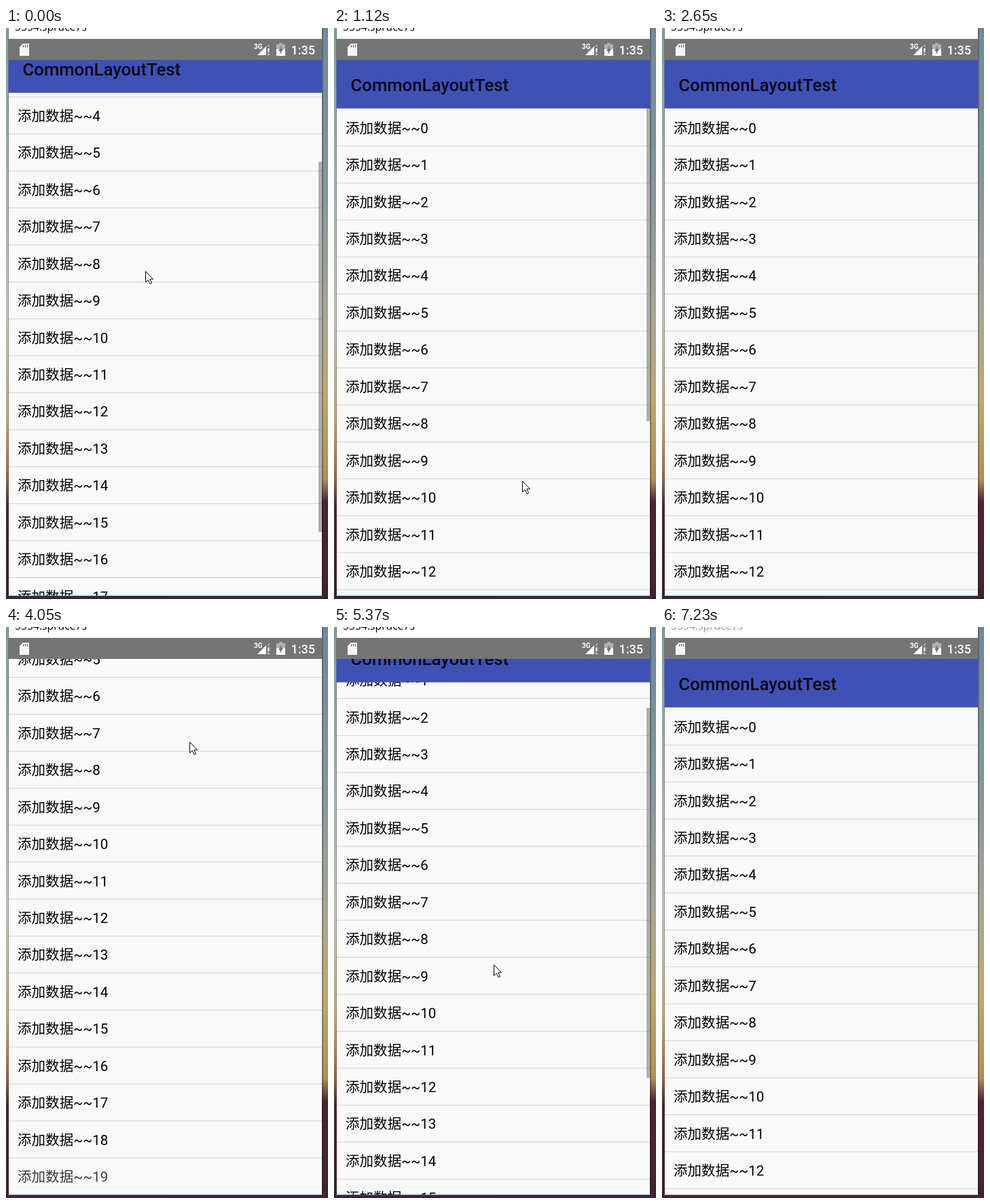
An HTML page with a canvas for the animation above (7330 ms loop, 474 by 841 pixels).

```html
<!DOCTYPE html>
<html lang="zh-CN">
<head>
<meta charset="utf-8">
<style>
  html, body { margin: 0; width: 474px; height: 841px; overflow: hidden; }
  canvas { display: block; }
</style>
</head>
<body>
<canvas id="stage" width="474" height="841"></canvas>
<script>
const ctx = document.getElementById('stage').getContext('2d');
const LOOP = 7330, STEP = 130;
const LEFT = 4, WIDTH = 461, TOP = 47, BOTTOM = 836;
const BAR = 72, ROW = 54.45, ROWS = 20;
const MAX_SCROLL = ROWS * ROW - (BOTTOM - TOP);

// The pointer's route; everything that scrolls follows from its drags.
const route = [{ time: 0, x: 205, y: 358 }];
const hover = (time, x, y) => route.push({ time, x, y });
const drag = (time, x, y) => route.push({ time, x, y, pressed: true });
const leave = time => route.push({ time, x: 0, y: 900, away: true });

drag(270, 244, 187);
hover(420, 244, 195);
drag(1120, 277, 667);
drag(1630, 283, 365);
drag(2110, 306, 790);
hover(2380, 383, 820);
leave(2530);
hover(2950, 315, 790);
hover(3230, 232, 560);
drag(4050, 270, 169);
hover(4290, 262, 299);
drag(4680, 236, 461);
drag(4950, 236, 585);
hover(5220, 236, 534);
drag(5370, 235, 497);
drag(5610, 240, 350);
drag(5970, 289, 740);
leave(6120);
hover(6270, 402, 822);
leave(6400);

const clamp = (value, low, high) => Math.min(high, Math.max(low, value));

// Share of a move done at time t, advancing in even held steps.
function progress(from, to, t) {
  if (t >= to.time) return 1;
  if (from.away) return 0;
  const span = to.time - from.time;
  const steps = Math.max(1, Math.round(span / STEP));
  return Math.floor((t - from.time) / span * steps) / steps;
}

// A drag first hides or shows the bar; what is left scrolls the list.
function stateAt(t) {
  const state = { hidden: 23, scroll: 212.6, lastDrag: 0, x: route[0].x, y: route[0].y };
  for (let i = 1; i < route.length && t >= route[i - 1].time; i++) {
    const from = route[i - 1], to = route[i];
    const u = progress(from, to, t);
    state.x = from.x + (to.x - from.x) * u;
    state.y = from.y + (to.y - from.y) * u;
    if (!to.pressed || u === 0) continue;
    const dy = (from.y - to.y) * u;
    const hidden = clamp(state.hidden + dy, 0, BAR);
    state.scroll = clamp(state.scroll + dy - (hidden - state.hidden), 0, MAX_SCROLL);
    state.hidden = hidden;
    state.lastDrag = Math.min(t, to.time);
  }
  return state;
}

function rect(color, x, y, w, h) {
  ctx.fillStyle = color;
  ctx.fillRect(x, y, w, h);
}

function text(string, x, y, font, color) {
  ctx.font = font;
  ctx.fillStyle = color;
  ctx.fillText(string, x, y);
}

function shape(color, ...points) {
  ctx.beginPath();
  points.forEach(([x, y]) => ctx.lineTo(x, y));
  ctx.closePath();
  ctx.fillStyle = color;
  ctx.fill();
}

function gradient(...stops) {
  const fill = ctx.createLinearGradient(0, 0, 0, 841);
  stops.forEach(([at, color]) => fill.addColorStop(at, color));
  return fill;
}

const leftSky = gradient([0, '#7f9f9f'], [.5, '#bcc5b2'], [.68, '#c3a878'],
  [.73, '#c08a50'], [.79, '#a0653f'], [.84, '#4c2632'], [1, '#40222f']);
const rightSky = gradient([0, '#71889a'], [.3, '#87989c'], [.5, '#a9a695'],
  [.65, '#bca970'], [.79, '#ae9058'], [.83, '#4c2632'], [1, '#43222f']);

function drawDesktop(focused) {
  rect(leftSky, 0, 0, 237, 841);
  rect(rightSky, 237, 0, 237, 841);
  rect('rgba(0,0,0,.25)', 3, 0, 1, BOTTOM);
  rect('rgba(0,0,0,.25)', 465, 0, 2, BOTTOM);
  rect(focused ? '#1c79bd' : '#777', 3, BOTTOM, 463, 1);
  rect('#fff', LEFT, 0, WIDTH, 16);
  text('5554:spruce7s', 13, 4, '15.7px "Open Sans", sans-serif', focused ? '#000' : '#999');
}

function drawStatusBar() {
  rect('#757575', LEFT, 16, WIDTH, 31);
  shape('#f4f4f4', [25, 23], [34, 23], [34, 41], [20, 41], [20, 28]);
  for (let x = 25; x < 34; x += 3) rect('#757575', x, 25, 1.4, 3.5);

  text('3G', 365, 31, '700 10px Roboto, sans-serif', '#fff');
  shape('#a0a0a0', [388, 23], [388, 28], [383, 28]);
  shape('#fff', [370, 40], [383, 27], [383, 40]);
  rect('#fff', 385.5, 30, 2, 6);
  rect('#fff', 385.5, 38, 2, 2);

  rect('#b0b0b0', 402, 22, 5, 3);
  rect('#b0b0b0', 398, 24, 13, 7);
  rect('#fff', 398, 31, 13, 10);
  shape('#757575', [405.5, 26], [405.5, 31], [408, 31], [403.5, 39], [403.5, 34], [401, 34]);
  text('1:35', 419.5, 38.5, '500 18px Roboto, sans-serif', '#fff');
}

function drawList(top, lastColor) {
  const font = '20.57px Roboto, "Noto Sans CJK SC", "Noto Sans CJK", sans-serif';
  for (let i = 0; i < ROWS; i++) {
    const y = top + i * ROW;
    text('添加数据~~' + i, 17, y + 35.6, font, i === ROWS - 1 ? lastColor : '#000');
    rect('#d6d6d6', LEFT, y + ROW - .1, WIDTH, 1.1);
  }
}

// Shown while scrolling away from the end, then fades out.
function drawThumb({ hidden, scroll }, idle, atEnd) {
  const alpha = atEnd || idle >= 540 ? 0 : idle >= 400 ? .15 : .3;
  rect(`rgba(0,0,0,${alpha})`, 460, Math.round(34 + .692 * (hidden + scroll)), 5, 545);
}

function drawCursor(x, y) {
  ctx.save();
  ctx.translate(Math.round(x) + .5, Math.round(y) + .5);
  shape('#fff', [0, 0], [0, 16], [3.7, 12.5], [6.5, 18.5], [9, 17.5], [6.3, 11.5], [11, 11.5]);
  ctx.strokeStyle = '#000';
  ctx.lineWidth = 1;
  ctx.stroke();
  ctx.restore();
}

function draw(t) {
  const state = stateAt(t);
  const barBottom = TOP + BAR - state.hidden;
  const atEnd = state.scroll === MAX_SCROLL;
  const arriving = atEnd && stateAt(t - STEP).scroll < MAX_SCROLL;

  drawDesktop(t < 7230);
  ctx.save();
  ctx.beginPath();
  ctx.rect(LEFT, TOP, WIDTH, BOTTOM - TOP);
  ctx.clip();
  rect('#f9f9f9', LEFT, TOP, WIDTH, BOTTOM - TOP);
  drawList(barBottom - state.scroll, arriving ? '#3a3a3a' : '#000');
  drawThumb(state, t - state.lastDrag, atEnd);
  if (state.hidden < BAR) rect('#3f51b5', LEFT, TOP, WIDTH, barBottom - TOP - .5);
  text('CommonLayoutTest', 24.5, 93 - state.hidden, '500 25.7px Roboto, sans-serif', '#080a17');
  ctx.restore();
  drawStatusBar();
  drawCursor(state.x, state.y);
}

function tick() {
  draw(performance.now() % LOOP);
  requestAnimationFrame(tick);
}
tick();
</script>
</body>
</html>
```
